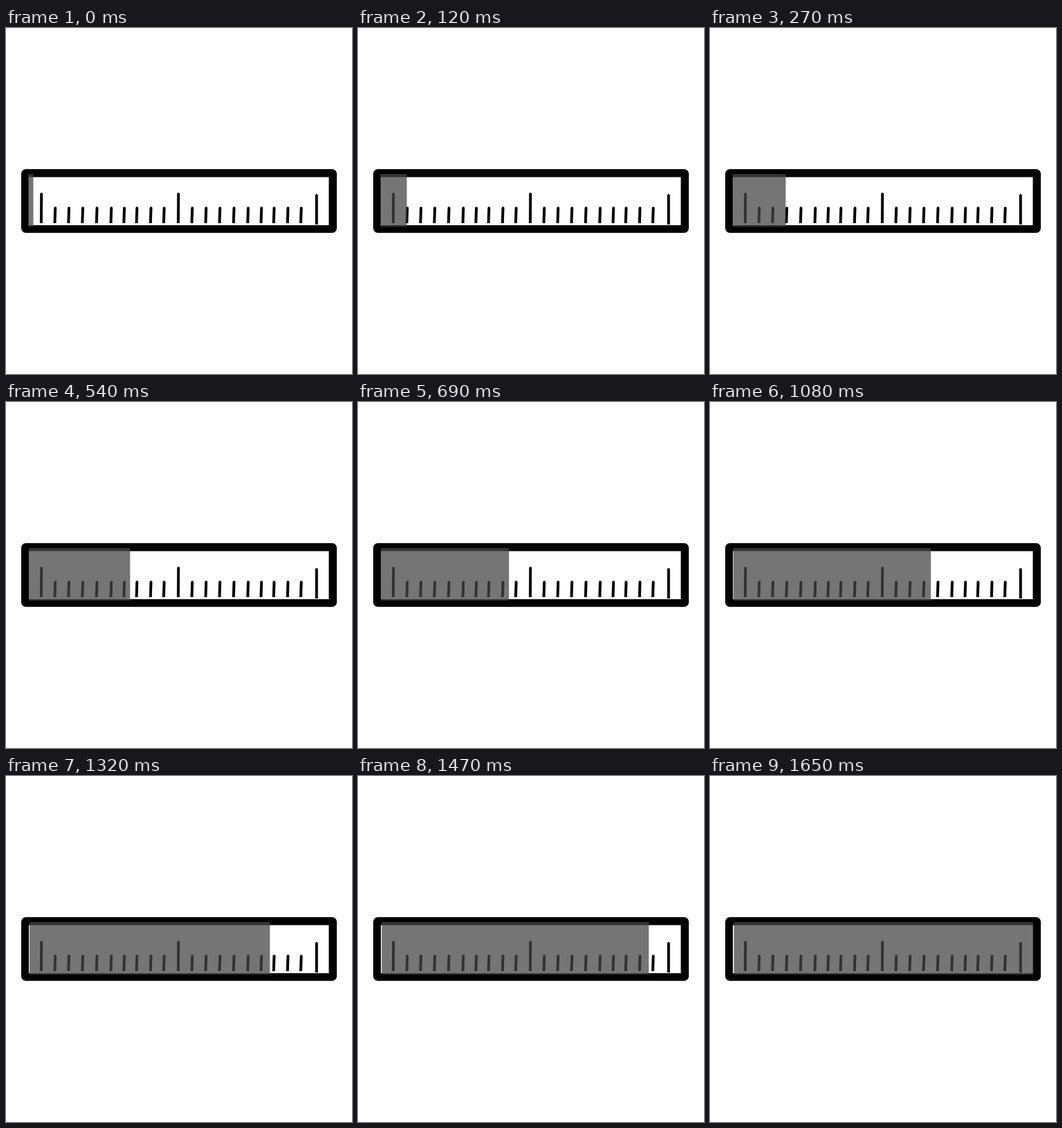
Recreate the animation shown at these times as an HTML page. Size 500 by 500 pixels, loop 1800 ms.

```html
<!DOCTYPE html>
<html lang="en">
<head>
<meta charset="utf-8">
<title>Ruler fill</title>
<style>
  html, body { margin: 0; width: 100%; height: 100%; overflow: hidden; background: #fff; }
  svg { display: block; width: 100%; height: 100%; }
</style>
</head>
<body>
<svg viewBox="0 0 500 500">
  <rect x="22" y="204" width="456" height="92" rx="6.5"/>
  <rect x="33" y="215.5" width="433.5" height="69.5" fill="#fff"/>
  <path id="ticks"/>
  <rect id="fill" y="211" height="76" fill="#454545" fill-opacity=".74"/>
</svg>
<script>
const LOOP = 1800, STEP = 30, LAST_STEP = 55;
const ticks = document.getElementById('ticks');
const fill = document.getElementById('fill');

// Round on top, flat at the bottom, with a slight lean.
const tick = (x, top, bottom, lean = 0.7) =>
  `M${x - 2 - lean} ${bottom}L${x - 2} ${top + 2}a2 2 0 0 1 4 0L${x + 2 - lean} ${bottom}z`;

const shortTicks = [71.2, 91, 111, 131.5, 152.2, 171, 189.3, 209.5, 228.6,
  269.2, 289.2, 309.2, 329.5, 350, 369.2, 387.5, 407.5, 426.7];

ticks.setAttribute('d', [
  tick(51.2, 238, 282, 0.3),
  tick(249.2, 238, 282, 0.3),
  tick(448.8, 240, 284, 0),
  ...shortTicks.map(x => tick(x, 258.3, 282))
].join(''));

function draw(now) {
  const step = Math.min(LAST_STEP, Math.floor(now % LOOP / STEP));
  const left = 32 + 2.5 * step / LAST_STEP;
  const right = 39.5 + 7.77 * step;
  fill.setAttribute('x', left);
  fill.setAttribute('width', right - left);
}

const start = performance.now();
function loop() {
  draw(performance.now() - start);
  requestAnimationFrame(loop);
}
loop();
</script>
</body>
</html>
```
